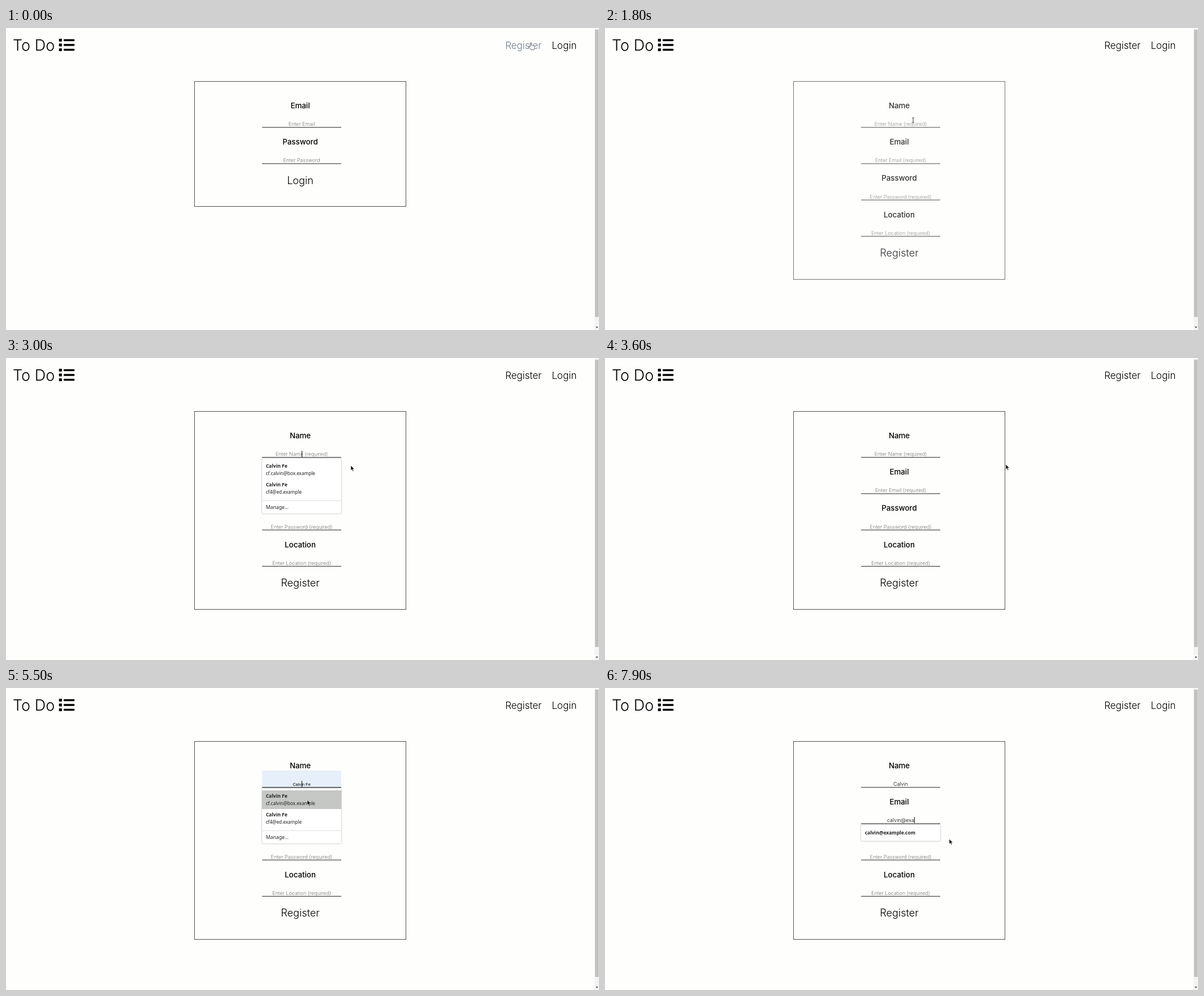
Write an HTML page that moves like this. It is 1049x534 px and loops after 8 s.

```html
<!DOCTYPE html>
<html lang="en">
<head>
<meta charset="utf-8">
<title>To Do</title>
<style>
  html, body { margin: 0; width: 100%; height: 100%; overflow: hidden; background: #fefefd; }
  svg { display: block; width: 100%; height: 100%; }
  text { font-family: Inter, sans-serif; font-weight: 300; font-optical-sizing: none; white-space: pre; }
  .title { font-size: 27.1px; }
  .nav { font-size: 17px; }
  .label { font-size: 13.3px; font-weight: 500; text-anchor: middle; }
  .hint, .typed { font-size: 9px; text-anchor: middle; }
  .hint { fill: #757575; }
  .button { font-size: 18.1px; text-anchor: middle; }
  .auto { font: 400 7.5px "Liberation Sans", Arial, sans-serif; text-anchor: middle; }
  .name, .mail, .menu { font-family: "Noto Sans", "Open Sans", sans-serif; fill: #222; }
  .name { font-size: 8.5px; font-weight: 600; }
  .mail { font-size: 8.2px; font-weight: 400; }
  .menu { font-size: 8.7px; font-weight: 400; }
  .line { stroke: #222; }
  .card { fill: none; stroke: #505050; }
  .popup { transform-origin: 523px 228px; }
  .sheet { fill: #fff; filter: drop-shadow(0 .7px 1px rgba(0, 0, 0, .42)); }
  .arrow { fill: #111; stroke: #fff; stroke-width: .5; }
  .hand { fill: #fff; stroke: #555; stroke-width: .9; stroke-linejoin: round; }
  .beam { fill: none; stroke: #222; stroke-width: .9; }
</style>
</head>
<body>
<svg viewBox="0 0 1049 534" preserveAspectRatio="none">
  <text class="title" x="12" y="39.8">To Do</text>
  <g id="icon"></g>
  <text class="nav" id="register" x="883.2" y="36.5">Register</text>
  <text class="nav" x="965.5" y="36.5">Login</text>

  <rect x="1041" width="8" height="534" fill="#f4f4f4"/>
  <rect x="1042" y="3" width="6.5" height="508" fill="#c1c1c1"/>
  <path d="M1043 528h4.6l-2.3 2.8z" fill="#505050"/>

  <g id="loginForm"></g>
  <g id="registerForm"></g>

  <g id="preview">
    <rect x="453" y="146" width="140" height="29.5" fill="#e6effa"/>
    <path class="line" d="M453 175.7H593"/>
    <text class="auto" x="523" y="173">Calvin Fe</text>
  </g>
  <text class="typed" id="nameText" x="523" y="173.1"></text>
  <text class="typed" id="mailText" x="523" y="237.3"></text>
  <rect id="caret" width="1" height="11" fill="#111"/>

  <g id="people" class="popup">
    <rect class="sheet" x="453" y="177.5" width="140" height="97.5" rx="2"/>
    <rect id="hover" x="453" width="140" height="33" fill="#c5c7c5"/>
    <text class="name" x="459.7" y="194.2">Calvin Fe</text>
    <text class="mail" x="459.7" y="207.3">cf.calvin@box.example</text>
    <text class="name" x="459.7" y="227.3">Calvin Fe</text>
    <text class="mail" x="459.7" y="240.4">cf4@ed.example</text>
    <path d="M453 252.2H593" stroke="#ddd"/>
    <text class="menu" x="459.7" y="267">Manage…</text>
  </g>
  <g id="mails"></g>

  <g id="cursor">
    <path class="arrow" d="M0 0V8.8L2 7L3.5 10.4L4.9 9.8L3.4 6.5H6.2Z"/>
    <path class="hand" d="M-2.6 1V-5.4Q-1.6 -7.2 -.6 -5.4V-1.4Q.5 -2.3 1.3 -1Q2.5 -1.8 3.2 -.4Q4.6 -1 5 .6V3.4Q4.6 5 3.8 6.4H-1.6Q-3 4.2 -5 2Q-5.6 .2 -3.8 .2Z"/>
    <path class="beam" d="M-2 -4.3H-.6L0 -3.7L.6 -4.3H2M0 -3.7V3.7M-2 4.3H-.6L0 3.7L.6 4.3H2"/>
  </g>
</svg>

<script>
const $ = id => document.getElementById(id);
const LOOP = 8000, STEP = 100, PITCH = 64.2, ROW = 20.5;

const text = (cls, x, y, s) => `<text class="${cls}" x="${x}" y="${y}">${s}</text>`;

function form(fields, suffix, button, bottom) {
  const rows = fields.map((name, i) => {
    const y = i * PITCH;
    return text('label', 520.5, 142 + y, name) +
      `<path class="line" d="M453 ${175.7 + y}H593"/>` +
      text('hint', 523, 173.1 + y, `Enter ${name}${suffix}`);
  });
  const y = 275.7 + (fields.length - 2) * PITCH;
  return `<rect class="card" x="333.5" y="94.5" width="374" height="${bottom - 94.5}"/>` +
    rows.join('') + text('button', 520.5, y, button);
}

$('loginForm').innerHTML = form(['Email', 'Password'], '', 'Login', 315.5);
$('registerForm').innerHTML =
  form(['Name', 'Email', 'Password', 'Location'], ' (required)', 'Register', 444.5);
$('icon').innerHTML = [0, 1, 2].map(i => {
  const y = 21.5 + i * 8.5;
  return `<rect x="93.7" y="${y - 2.6}" width="5.2" height="5.2" rx=".8"/>` +
    `<rect x="102" y="${y - 1.7}" width="19.2" height="3.4" rx="1"/>`;
}).join('');
const hints = $('registerForm').querySelectorAll('.hint');
const shapes = [...$('cursor').children];

const ARROW = 0, HAND = 1, BEAM = 2;
// time, x, y, shape
const path = [
  [0, 930, 32, HAND], [400, 930, 32, HAND], [500, 918, 38, HAND], [600, 872, 62, ARROW],
  [900, 650, 132, ARROW], [1100, 563, 153, BEAM], [1200, 545, 163, BEAM], [1900, 545, 163, BEAM],
  [2000, 440, 180, ARROW], [2200, 217, 205, ARROW], [2300, 289, 230, ARROW],
  [2500, 360, 389, ARROW], [2700, 470, 300, ARROW], [2900, 550, 200, ARROW],
  [3000, 610, 190, ARROW], [3200, 706, 188, ARROW], [3500, 706, 188, ARROW],
  [3600, 709, 188, ARROW], [4500, 709, 188, ARROW], [4700, 995, 252, ARROW],
  [4900, 633, 205, ARROW], [5000, 633, 205, ARROW], [5100, 585, 172, BEAM],
  [5200, 545, 165, BEAM], [5300, 540, 166, BEAM], [5400, 535, 186, ARROW],
  [5500, 533, 198, ARROW], [5600, 600, 240, ARROW], [5800, 600, 240, ARROW],
  [5900, 609, 267, ARROW], [LOOP, 609, 267, ARROW]
];
const nameTyping = [[0, ''], [6100, 'C'], [6300, 'Ca'], [6400, 'Cal'], [6500, 'Calv'], [6600, 'Calvin']];
const mailTyping = [[0, ''], [6900, 'c'], [7100, 'ca'], [7200, 'cal'], [7300, 'calv'],
  [7500, 'calvin'], [7600, 'calvin@'], [7800, 'calvin@e'], [7900, 'calvin@exa']];
const focus = [[0, ''], [2000, 'name'], [3300, ''], [5200, 'name'], [5900, ''], [6100, 'name'], [6700, 'mail']];
const popup = [[0, 0], [2000, 1], [3300, .5], [3400, .07], [3600, 0],
  [5300, 1], [6700, .5], [6800, .07], [6900, 0]];
const saved = ['calvin@example.com', 'calvin@sample.example', 'calvin2@example.com',
  'calvin3@example.com', 'caleb@example.com', 'calla@example.com'];

const at = (list, t) => list.findLast(k => k[0] <= t)[1];
const clamp = v => Math.max(0, Math.min(1, v));
const show = (el, on) => el.setAttribute('visibility', on ? 'visible' : 'hidden');

function cursorAt(t) {
  const i = path.findLastIndex(k => k[0] <= t);
  const a = path[i], b = path[i + 1];
  const k = (t - a[0]) / (b[0] - a[0]);
  return [a[1] + (b[1] - a[1]) * k, a[2] + (b[2] - a[2]) * k, a[3]];
}

function drawMails(typed) {
  const list = typed ? saved.filter(s => s.startsWith(typed)) : [];
  $('mails').innerHTML = list.length ?
    `<rect class="sheet" x="453" y="241.5" width="140" height="${29 + (list.length - 1) * ROW}" rx="2"/>` +
    list.map((s, i) => text('name', 459.7, 259 + i * ROW, s)).join('') : '';
}

function draw(t) {
  const [x, y, shape] = cursorAt(t);
  $('cursor').setAttribute('transform', `translate(${x} ${y})`);
  shapes.forEach((el, i) => show(el, i === shape));
  $('register').setAttribute('fill', shape === HAND ? 'slategray' : '#000');

  $('loginForm').setAttribute('opacity', clamp((1200 - t) / 500));
  $('registerForm').setAttribute('opacity', clamp((t - 1400) / 500));

  const alpha = at(popup, t);
  const row = alpha === 1 && x >= 453 && x < 593 ? Math.floor((y - 181) / 33) : -1;
  const over = row === 0 || row === 1;
  $('people').style.opacity = alpha;
  $('people').style.transform = `scale(${alpha === 1 ? 1 : alpha === .5 ? .98 : .95})`;
  show($('hover'), over);
  $('hover').setAttribute('y', 181 + row * 33);
  show($('preview'), over);

  const name = at(nameTyping, t), mail = at(mailTyping, t), field = at(focus, t);
  $('nameText').textContent = name;
  $('mailText').textContent = mail;
  show(hints[0], !name && !over);
  show(hints[1], !mail);
  drawMails(mail);

  const input = field === 'mail' ? $('mailText') : $('nameText');
  const width = input.textContent ? input.getComputedTextLength() : 0;
  show($('caret'), field);
  $('caret').setAttribute('x', Math.round(523 + width / 2));
  $('caret').setAttribute('y', field === 'mail' ? 228 : 164);
}

const start = performance.now();
let last = -1;
function tick() {
  const t = Math.floor((performance.now() - start) % LOOP / STEP) * STEP;
  if (t !== last) draw(last = t);
  requestAnimationFrame(tick);
}
tick();
</script>
</body>
</html>
```
